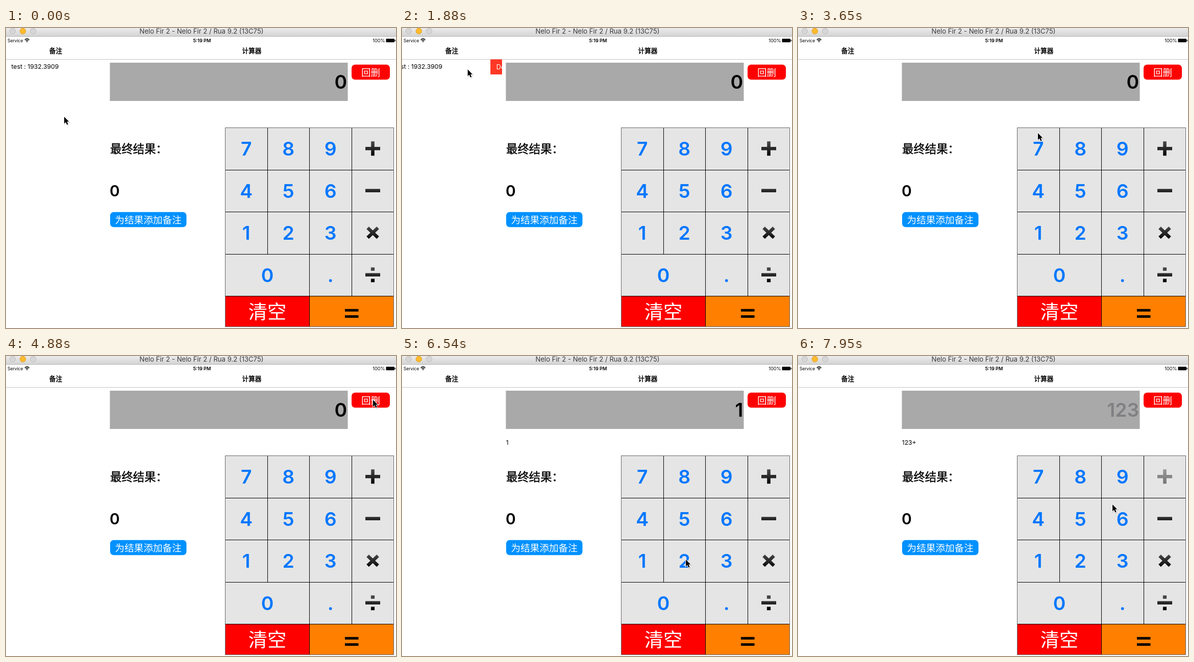
Write an HTML page that moves like this. It is 764 by 588 pixels and loops after 8000 ms.

```html
<!DOCTYPE html>
<html lang="zh">
<head>
<meta charset="utf-8">
<title>计算器</title>
<style>
  html, body { margin: 0; width: 100%; height: 100%; overflow: hidden; background: #fff; }
  svg { display: block; width: 100vw; height: 100vh; }
  text { font-family: Inter, "Noto Sans CJK SC", "Noto Sans CJK", sans-serif; }
  .mid { text-anchor: middle; }
  .end { text-anchor: end; }
  .bold { font-weight: 600; }
  .medium { stroke: #000; stroke-width: .45; }
  .status { font-size: 9.2px; }
  .body { font-size: 12.2px; }
  .nav { font-size: 12.7px; }
  .button { font-size: 18.6px; font-weight: 300; fill: #fff; }
  .big { font-size: 37.3px; font-weight: 600; }
  .key { fill: #07f; }
  .op { fill: none; stroke: url(#ink); stroke-width: 6.6; }
  .line { fill: none; stroke: #000; shape-rendering: crispEdges; }
</style>
</head>
<body>
<svg viewBox="0 0 764 588">
  <defs>
    <linearGradient id="bar" x2="0" y2="1">
      <stop stop-color="#ebebeb"/><stop offset="1" stop-color="#d4d4d4"/>
    </linearGradient>
    <linearGradient id="ink" gradientUnits="userSpaceOnUse" x1="0" y1="-14" x2="0" y2="14">
      <stop stop-color="#4a4a4a"/><stop offset=".6" stop-color="#222"/><stop offset="1"/>
    </linearGradient>
    <clipPath id="cell"><path d="M0 61.5H196V91H0Z"/></clipPath>
    <path id="arrow" d="M0 0V13.2L3.1 10.4 5.3 15.6 7.6 14.6 5.4 9.6H9.4Z"/>
  </defs>
  <rect width="764" height="588" fill="#fff"/>

  <!-- window title bar -->
  <rect width="764" height="16" fill="url(#bar)"/>
  <path d="M0 16.5H764" stroke="#b4b4b4"/>
  <g fill="#d6d6d6" stroke="#bfbfbf">
    <circle cx="13" cy="6" r="5.7"/>
    <circle cx="33" cy="6" r="5.7" fill="#fdbb2d" stroke="#e2a32c"/>
    <circle cx="53" cy="6" r="5.7"/>
  </g>
  <text class="mid" x="383" y="11" font-size="13.1" fill="#3a3a3a">Nelo Fir 2 - Nelo Fir 2 / Rua 9.2 (13C75)</text>

  <!-- status and navigation bars -->
  <text x="3" y="28" font-size="8.5">Service</text>
  <path d="M36.8 23.2Q41.2 19 45.6 23.2M38.6 25.1Q41.2 22.6 43.8 25.1" fill="none" stroke="#000" stroke-width="1.4"/>
  <path d="M39.6 26.3Q41.2 25 42.8 26.3L41.2 28Z"/>
  <text class="status mid bold" x="384" y="28">5:19 PM</text>
  <text class="status end" x="742.5" y="28">100%</text>
  <rect x="744.5" y="21" width="16.5" height="7" rx="1.3"/>
  <rect x="761.6" y="23" width="1.4" height="3" rx=".6"/>
  <text class="nav medium mid" x="97.5" y="49.3">备注</text>
  <text class="nav medium mid" x="481.5" y="49.3">计算器</text>
  <path d="M0 61.5H764" stroke="#c4c4c4"/>

  <!-- note list -->
  <g id="note" clip-path="url(#cell)">
    <text id="noteText" class="body" x="10.5" y="80.3">test : 1932.3909</text>
    <g id="remove">
      <rect y="61" width="64" height="30" fill="#ff3826"/>
      <text class="mid" x="31" y="81" font-size="12.8" fill="#fff">Delete</text>
    </g>
  </g>

  <!-- display and results -->
  <rect x="203.5" y="68" width="466" height="75" fill="#a9a9a9"/>
  <text id="display" class="big end" x="668.2" y="119.3"></text>
  <rect x="677" y="71.7" width="75" height="29.6" rx="7" fill="#f00"/>
  <text class="button mid" x="714.5" y="93.6">回删</text>
  <text id="formula" class="body" x="203.7" y="174"></text>
  <text class="medium" x="204" y="245" font-size="22.4">最终结果：</text>
  <text class="bold" x="203" y="330" font-size="30">0</text>
  <rect x="204" y="360.7" width="149.5" height="29.6" rx="7" fill="#0091ff"/>
  <text class="button mid" x="278.7" y="382.6">为结果添加备注</text>

  <!-- keypad -->
  <rect x="429.5" y="195.5" width="330" height="330" fill="#e5e5e5"/>
  <rect x="429.5" y="525.5" width="165" height="60" fill="#f00"/>
  <rect x="594.5" y="525.5" width="165" height="60" fill="#ff8000"/>
  <path class="line" d="M429.5 278.1H759.5M429.5 360.5H759.5M429.5 443.1H759.5M429.5 525.5H759.5M512.1 195.5V443M594.5 195.5V585.5M677.1 195.5V525.5"/>
  <rect class="line" x="429.5" y="195.5" width="330" height="390" style="stroke:#666"/>
  <g id="keys"></g>
  <text class="mid" x="512" y="570" font-size="37.3" fill="#fff">清空</text>
  <path d="M664 553.2H690.5M664 565.4H690.5" stroke="#000" stroke-width="5"/>

  <g id="cursor">
    <use href="#arrow" x=".8" y="1.4" fill="none" stroke="#000" stroke-width="2" opacity=".14"/>
    <use href="#arrow" stroke="#fff" stroke-width="1.8" paint-order="stroke"/>
  </g>
</svg>
<script>
const LOOP = 8000, FRAME = 88, PITCH = 82.5;
const el = id => document.getElementById(id);
const clamp = (v, low, high) => Math.max(low, Math.min(high, v));

const keyAt = (label, column, row) =>
  `<text class="big key mid" x="${470.7 + column * PITCH}" y="${250 + row * PITCH}">${label}</text>`;
const operators = [
  'M-14.5 0H14.5M0-14V14',
  'M-14.5 0H14.5',
  'M-10-9.6L10 9.6M10-9.6L-10 9.6',
  'M-14.5 0H14.5M-3.6-11.2H3.6M-3.6 11.2H3.6'
];
el('keys').innerHTML =
  [...'789456123'].map((d, i) => keyAt(d, i % 3, Math.floor(i / 3))).join('') +
  keyAt(0, .5, 3) + keyAt('.', 2, 3) +
  operators.map((d, i) => `<path class="op" d="${d}" transform="translate(718.5 ${236.2 + i * PITCH})"/>`).join('');
const plus = document.querySelector('.op');

// Each gesture carries the resting cursor to a new spot between two moments.
const gesture = (start, end, x, y) => ({ start, end, x, y });
const gestures = [
  gesture(720, 1080, 158, 118),
  gesture(1170, 1350, 134, 94),
  gesture(1440, 1530, 153, 82),
  gesture(1800, 2320, 68, 79),    // swipe the note open
  gesture(2490, 2760, 143, 78),   // Delete
  gesture(3390, 3650, 470, 206),
  gesture(3830, 4700, 719, 86),   // backspace
  gesture(5050, 5920, 465, 419),  // 1
  gesture(6280, 6540, 556, 399),  // 2
  gesture(6800, 7080, 636, 400),  // 3
  gesture(7170, 7600, 724, 240),  // plus
  gesture(7865, 7950, 616, 291)
];

function cursorAt(t) {
  let x = 114, y = 174;
  for (const g of gestures) {
    if (t < g.start) break;
    const steps = Math.round((g.end - g.start) / FRAME) + 1;
    const done = Math.floor((t - g.start) / FRAME + .1) + 1;
    const p = Math.min(1, done / steps);
    x += (g.x - x) * p;
    y += (g.y - y) * p;
  }
  return [x, y];
}

function draw(t) {
  const [x, y] = cursorAt(t);
  el('cursor').setAttribute('transform', `translate(${x} ${y})`);

  const swipe = t < 1800 ? 0 : t < 2400 ? clamp(153 - x, 0, 63) : 63;
  el('note').style.display = t < 3030 ? '' : 'none';
  el('noteText').setAttribute('x', 10.5 - swipe);
  el('remove').setAttribute('transform', `translate(${197.5 - swipe} 0)`);

  const typed = '123'.slice(0, [6100, 6720, 7080].filter(at => t >= at).length);
  const added = t >= 7780;
  el('display').textContent = typed || '0';
  el('display').setAttribute('fill', added ? '#808084' : '#000');
  el('formula').textContent = typed + (added ? '+' : '');
  plus.setAttribute('opacity', added ? .5 : 1);
}

function tick() {
  draw(performance.now() % LOOP);
  requestAnimationFrame(tick);
}
tick();
</script>
</body>
</html>
```
